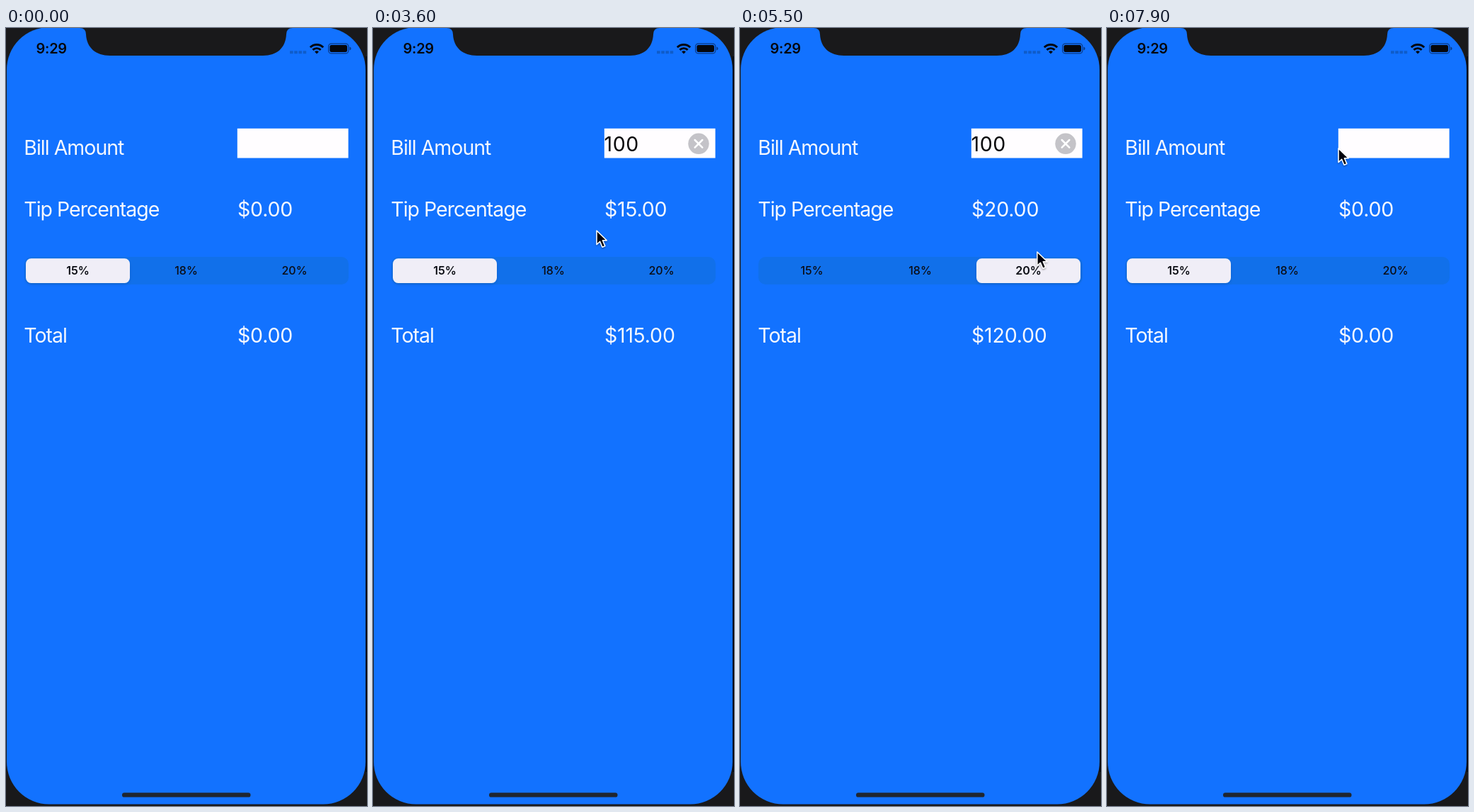
Recreate the animation shown at these times as an HTML page. Size 510 by 1098 pixels, loop 8 s.

```html
<!DOCTYPE html>
<html lang="en">
<head>
<meta charset="utf-8">
<title>Tip calculator</title>
<style>
  html, body { margin: 0; width: 100%; height: 100%; overflow: hidden; background: #19191b; }
  svg { display: block; width: 100vw; height: 100vh; }
  text { font-family: Inter, sans-serif; }
  .label, .sum { font-size: 28.5px; font-weight: 400; fill: #f6f8fe; letter-spacing: -1px; }
  .sum { letter-spacing: -0.2px; }
  .seg { font-size: 16px; text-anchor: middle; fill: #0b0d14; }
</style>
</head>
<body>
<svg viewBox="0 0 510 1098" xmlns="http://www.w3.org/2000/svg">
  <defs>
    <filter id="soft" x="-10%" y="-30%" width="120%" height="170%">
      <feDropShadow dx="0" dy="2" stdDeviation="2" flood-color="#002" flood-opacity=".12"/>
    </filter>
    <filter id="lift" x="-40%" y="-30%" width="200%" height="180%">
      <feDropShadow dx="0" dy="1.5" stdDeviation="1.2" flood-color="#000" flood-opacity=".35"/>
    </filter>
  </defs>

  <rect width="510" height="1098" fill="#19191b"/>
  <rect x="508" y="40" width="2" height="1010" fill="#06080d"/>
  <rect x="1" y="-1" width="507" height="1096.5" rx="60" fill="#1272ff"/>
  <path d="M104 0Q113 0 113 9C114 28 127 39 147 39H363C383 39 395 28 396 9Q396 0 405 0Z" fill="#19191b"/>

  <!-- status bar -->
  <text x="42.6" y="36" font-size="20" font-weight="600" letter-spacing="-0.3" fill="#05070c">9:29</text>
  <path d="M401 34.2h23.2" stroke="#0f5cc9" stroke-width="4" stroke-dasharray="4.6 1.6"/>
  <g fill="none" stroke="#05070c" stroke-width="2.9">
    <path d="M429.8 27.3A13 13 0 0 1 448.2 27.3M433.4 30.9A8 8 0 0 1 444.6 30.9"/>
    <path d="M439 36.5l-2.9-2.9a4.1 4.1 0 0 1 5.8 0Z" fill="#05070c" stroke="none"/>
  </g>
  <rect x="455.6" y="22.1" width="28.2" height="13.8" rx="4" fill="none" stroke="#0a3a84" stroke-width="1.2"/>
  <rect x="457.4" y="23.9" width="24.6" height="10.2" rx="2.4" fill="#05070c"/>
  <path d="M485.4 26.6q2.2 .8 2.2 2.4t-2.2 2.4Z" fill="#0a3a84"/>

  <!-- form -->
  <text class="label" x="25.3" y="179">Bill Amount</text>
  <text class="label" x="25.3" y="266">Tip Percentage</text>
  <text class="label" x="25.3" y="444">Total</text>
  <text class="sum" id="tip" x="327" y="266"></text>
  <text class="sum" id="total" x="327" y="444"></text>

  <rect x="326.8" y="141.8" width="156.8" height="41.7" fill="#fffdff"/>
  <text id="bill" x="326.5" y="173.5" font-size="28.5" letter-spacing="0.6" fill="#08080a"></text>
  <g id="clear">
    <circle cx="460" cy="163.3" r="14.7" fill="#c4c3c8"/>
    <path d="M454.7 158l10.6 10.6m0-10.6l-10.6 10.6" stroke="#fff" stroke-width="2.5" stroke-linecap="round"/>
  </g>

  <rect x="26" y="323" width="458" height="39" rx="10" fill="#1170ea"/>
  <rect id="pill" y="325.3" width="147" height="34.7" rx="7.5" fill="#f0eef7" filter="url(#soft)"/>
  <g id="segments"></g>

  <g id="menu">
    <path d="M294 77H362a9 9 0 0 1 9 9V113a9 9 0 0 1-9 9H340L328 133.5 316 122H294a9 9 0 0 1-9-9V86a9 9 0 0 1 9-9Z" fill="#222326"/>
    <text x="328" y="106" font-size="16.5" text-anchor="middle" fill="#f3f3f5">Paste</text>
  </g>

  <rect x="164" y="1079.2" width="181.5" height="6.4" rx="3.2" fill="#20262f"/>

  <path id="cursor" d="M0 0V19.5L4.6 15.2 8 23.2 11.8 21.6 8.4 13.8H14.2Z" fill="#050507" stroke="#fff" stroke-width="1.5" stroke-linejoin="round" filter="url(#lift)"/>
</svg>
<script>
  const LOOP = 8000, STEP = 100, PITCH = 153;
  const TYPE = 2000, PICK_18 = 4200, PICK_20 = 5200, CLEAR = 6800, PICK_15 = 7500;
  const RATES = [15, 18, 20];

  // pointer stops: time, x, y
  const stops = [
    [500, 512, 330], [1100, 390, 168], [2800, 390, 168], [3600, 316, 286],
    [PICK_18, 262, 342], [4800, 371, 349], [PICK_20, 410, 346], [6400, 473, 154],
    [CLEAR, 458, 163], [7400, 138, 353], [7900, 327, 170]
  ];

  const $ = id => document.getElementById(id);
  const clamp = p => Math.max(0, Math.min(1, p));
  const ease = p => p * p * (3 - 2 * p);
  const show = (el, on) => el.setAttribute("visibility", on ? "visible" : "hidden");
  const money = v => "$" + v.toFixed(2);

  $("segments").innerHTML = RATES.map((rate, i) =>
    `<text class="seg" x="${101.5 + PITCH * i}" y="348.3">${rate}%</text>`).join("");
  const labels = document.querySelectorAll(".seg");

  function pointAt(t) {
    const i = stops.findIndex(s => s[0] > t);
    if (i < 0) return stops[stops.length - 1].slice(1);
    const [t0, x0, y0] = stops[i - 1], [t1, x1, y1] = stops[i];
    const p = ease((t - t0) / (t1 - t0));
    return [x0 + (x1 - x0) * p, y0 + (y1 - y0) * p];
  }

  // selected segment as a number, given how far each click has taken effect
  const choice = done => done(PICK_18) + done(PICK_20) - 2 * done(PICK_15);

  function draw(t) {
    const picked = choice(at => t >= at ? 1 : 0);
    const slide = choice(at => ease(clamp((t - at + STEP) / 300)));
    const bill = t < CLEAR ? "100".slice(0, Math.max(0, Math.floor((t - TYPE) / 200))) : "";
    const tip = bill * RATES[picked] / 100;

    $("bill").textContent = bill;
    $("tip").textContent = money(tip);
    $("total").textContent = money(+bill + tip);
    show($("clear"), bill);
    show($("menu"), t >= 1300 && t < TYPE);
    $("pill").setAttribute("x", 28 + PITCH * slide);
    labels.forEach((el, i) => el.setAttribute("font-weight", i === picked ? 600 : 500));

    const seen = t >= stops[0][0];
    show($("cursor"), seen);
    if (seen) $("cursor").setAttribute("transform", `translate(${pointAt(t)})`);
  }

  const start = performance.now();
  function tick() {
    const t = (performance.now() - start) % LOOP;
    draw(Math.floor(t / STEP) * STEP);
    requestAnimationFrame(tick);
  }
  draw(0);
  tick();
</script>
</body>
</html>
```
